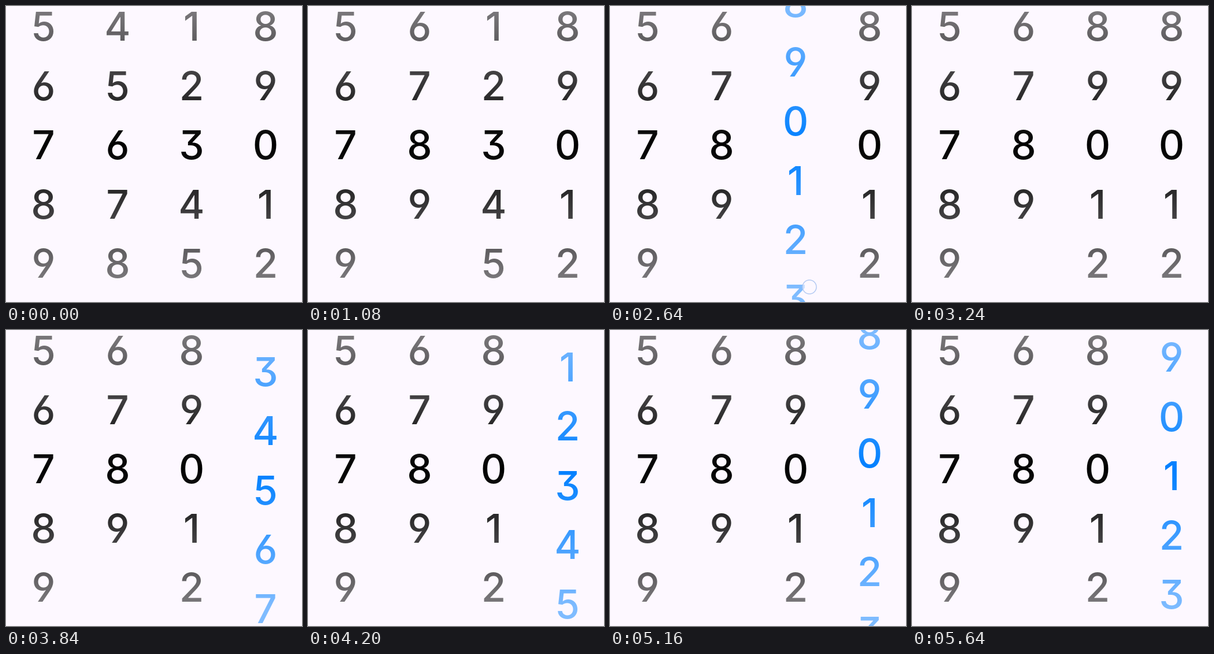
Write an HTML page that moves like this. It is 512 px wide and 512 px high and loops after 5760 ms.

```html
<!DOCTYPE html>
<html lang="en">
<head>
<meta charset="utf-8">
<title>Number wheels</title>
<style>
  html, body { margin: 0; width: 100%; height: 100%; overflow: hidden; background: #fdf8ff; }
  svg { display: block; width: 100%; height: 100%; }
  /* straight-stemmed 6 and 9, flat-topped 3 */
  text {
    font: 500 69px Inter, sans-serif;
    font-feature-settings: "cv03" 1, "cv04" 1, "cv09" 1;
    text-anchor: middle;
  }
</style>
</head>
<body>
<svg viewBox="0 0 512 512">
  <defs>
    <linearGradient id="fade" x1="0" y1="0" x2="0" y2="1">
      <stop offset="0" stop-color="#fdf8ff" stop-opacity=".5"/>
      <stop offset=".47" stop-color="#fdf8ff" stop-opacity="0"/>
      <stop offset=".94" stop-color="#fdf8ff" stop-opacity=".5"/>
    </linearGradient>
  </defs>
  <g id="wheels"></g>
  <rect width="512" height="512" fill="url(#fade)"/>
  <circle id="touch" r="12" fill="#fdf8ff" fill-opacity=".6" stroke="#b3c9f2" stroke-width="1.5"/>
</svg>
<script>
const LOOP = 5760, STEP = 120;
const ROW = 102.5, MID = 240, BASE = 25, BLUE = '#007fff';
const NS = 'http://www.w3.org/2000/svg';
const touch = document.getElementById('touch');

const clamp = v => Math.min(1, Math.max(0, v));
const part = (t, from, to) => clamp((t - from) / (to - from));
const easeOut = u => 1 - (1 - u) ** 2;

// A swipe speeds up with the finger, then glides against friction.
const drag = (t, from, to, rows) => rows * part(t, from, to) ** 1.3;
const glide = (t, from, rows) => rows * (1 - (1 - part(t, from, from + 2960)) ** 5.25);

const wheels = [
  { x: 65, wrap: false, pos: () => 7 },
  { x: 193, wrap: false, active: [480, 1080],
    pos: t => 6 + 2 * easeOut(part(t, 660, 980)) },
  { x: 321, wrap: true, active: [1440, 3120],
    pos: t => t < 2640
      ? 3 + drag(t, 1690, 1800, 2.6) + glide(t, 1800, 17.9)
      : 20 + 0.4 * (1 - easeOut(part(t, 2680, 3000))) },
  { x: 449, wrap: true, active: [3480, LOOP],
    pos: t => drag(t, 3640, 3840, 4.64) + glide(t, 3840, 16.36) }
];

const touches = [
  { x: 205, y: 486, from: 480, to: 720 },
  { x: 353, y: 484, from: 1440, to: 1720 },
  { x: 345, y: 486, from: 2600, to: 2800 },
  { x: 447, y: 481, from: 3480, to: 3700 }
];

for (const w of wheels) {
  w.group = document.getElementById('wheels').appendChild(document.createElementNS(NS, 'g'));
  w.cells = Array.from({ length: 7 }, () => {
    const cell = document.createElementNS(NS, 'text');
    cell.setAttribute('x', w.x);
    return w.group.appendChild(cell);
  });
}

function drawWheel(w, t) {
  const pos = w.pos(t), near = Math.round(pos);
  const lit = w.active && t >= w.active[0] && t < w.active[1];
  w.group.setAttribute('fill', lit ? BLUE : '#000');
  w.cells.forEach((cell, i) => {
    const n = near + i - 3;
    const shown = w.wrap || (n >= 0 && n <= 9);
    cell.textContent = shown ? (n + 10) % 10 : '';
    cell.setAttribute('y', (MID + BASE + (n - pos) * ROW).toFixed(2));
  });
}

function draw(t) {
  wheels.forEach(w => drawWheel(w, t));
  const p = touches.find(p => t >= p.from && t < p.to);
  touch.setAttribute('opacity', p ? 1 : 0);
  if (p) {
    touch.setAttribute('cx', p.x);
    touch.setAttribute('cy', p.y);
  }
}

const start = performance.now();
function tick() {
  const t = (performance.now() - start) % LOOP;
  draw(Math.floor(t / STEP) * STEP);
  requestAnimationFrame(tick);
}
draw(0);
requestAnimationFrame(tick);
</script>
</body>
</html>
```
